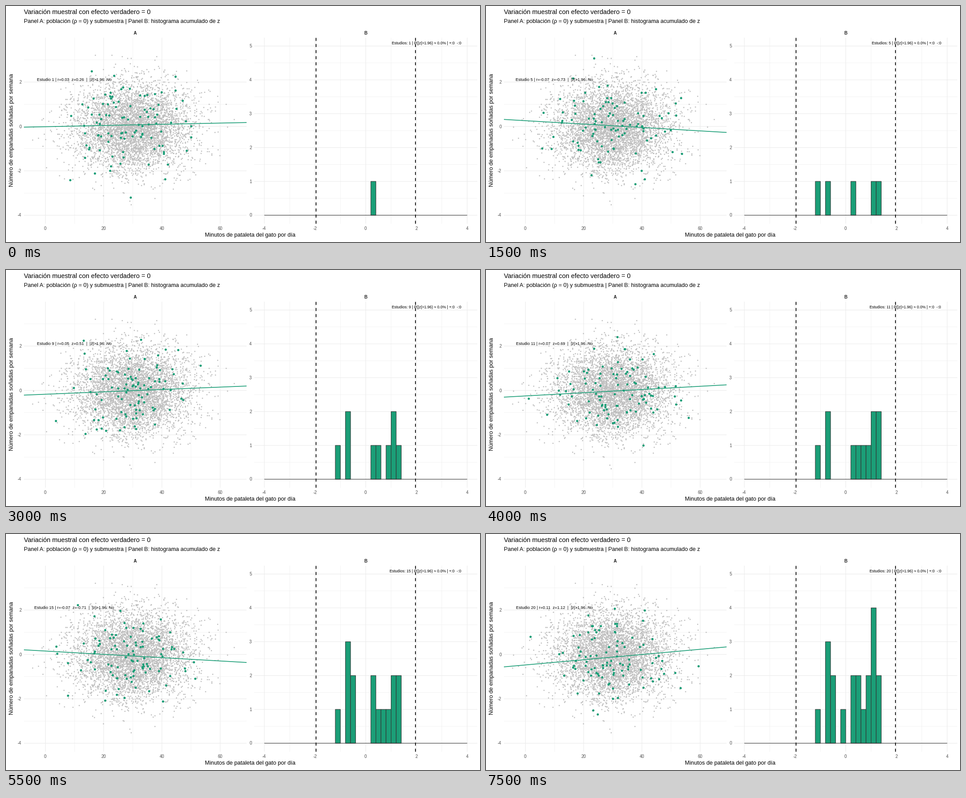
Recreate the animation shown at these times as a matplotlib script. Size 1058 by 529 pixels, loop 8000 ms.

```python
import numpy as np
import matplotlib.pyplot as plt
from matplotlib.animation import FuncAnimation

W, H, DPI = 1058, 529, 100
FRAMES, STUDIES, SIZE, POPULATION = 16, 20, 100, 5000
PX = 72 / DPI
GREEN, GREY, DARK, GRID = "#1b9e77", "#bebebe", "#333333", "#ebebeb"
TOP, BOTTOM = 71, 488
UNIT_AX, UNIT_AY, UNIT_BX, UNIT_BY = 6.5, 49.75, 56.6, 75.85

# z statistic of every study, in order
Z = np.array([0.26, -1.08, 1.08, 1.27, -0.73, 1.05, 0.84, -0.66, 0.51, 1.31,
              0.69, -0.47, -0.52, 0.21, -0.71, 0.92, 0.49, -0.08, 1.05, 1.12])
EDGES = np.round(np.arange(-4, 4.1, 0.2), 1)

plt.rcParams["font.family"] = "Liberation Sans"
fig = plt.figure(figsize=(W / DPI, H / DPI), dpi=DPI, facecolor="white")
ax = fig.add_axes([0, 0, 1, 1])
ax.set_xlim(0, W)
ax.set_ylim(H, 0)
ax.axis("off")


# data units to stage pixels
def ax_x(v):
    return 88 + UNIT_AX * v


def ax_y(v):
    return 270 - UNIT_AY * v


def bx_x(v):
    return 803 + UNIT_BX * v


def bx_y(v):
    return 469 - UNIT_BY * v


def label(x, y, s, size, ha="left", color="black", **kw):
    return ax.text(x, y, s, fontsize=size * PX, ha=ha, va="baseline",
                   color=color, zorder=9, **kw)


def line(xs, ys, width, color, z, **kw):
    return ax.plot(xs, ys, lw=width * PX, color=color, zorder=z, snap=False,
                   solid_capstyle="butt", dash_capstyle="butt", **kw)[0]


def dots(size, color, z):
    return ax.plot([], [], "o", ms=size * PX, mew=0, color=color, zorder=z)[0]


def panel(name, left, right, x_pos, y_pos, x_major, y_major, x_minor, y_minor):
    """Grid, tick labels and heading of one plot."""
    for xs, ys, width in ((x_minor, y_minor, 0.55), (x_major, y_major, 1.1)):
        for x in xs:
            line([x_pos(x)] * 2, [TOP, BOTTOM], width, GRID, width)
        for y in ys:
            line([left, right], [y_pos(y)] * 2, width, GRID, width)
    for v in x_major:
        label(x_pos(v) - 0.3, 501.5, str(v), 9.7, "center", "#4d4d4d")
    for v in y_major:
        label(left - 5.5, y_pos(v) + 3.5, str(v), 9.7, "right", "#4d4d4d")
    label((left + right) / 2 - 0.3, 64.5, name, 9.7, "center", "#1a1a1a",
          weight="bold")


def cloud(rng, n, reach):
    """Standard normal points no further out than `reach`."""
    p = rng.normal(size=(2 * n, 2))
    return p[np.hypot(*p.T) < reach][:n].T


panel("A", 40, 537, ax_x, ax_y, range(0, 61, 20), range(-4, 3, 2),
      range(10, 51, 20), range(-3, 4, 2))
panel("B", 554, 1052, bx_x, bx_y, range(-4, 5, 2), range(6),
      range(-3, 4, 2), np.arange(0.5, 5))

label(40, 18, "Variación muestral con efecto verdadero = 0", 14.4)
label(40, 38, "Panel A: población (ρ = 0) y submuestra | "
      "Panel B: histograma acumulado de z", 12.55)
label(545.5, 516.5, "Minutos de pataleta del gato por día", 12.65, "center")
label(16, 278.5, "Número de empanadas soñadas por semana", 12.65, "center",
      rotation=90, rotation_mode="anchor")

px, py = cloud(np.random.default_rng(7), POPULATION, 3.6)
dots(2.7, GREY, 2).set_data(ax_x(30 + 10 * px), ax_y(py))

points = dots(5, GREEN, 3)
fit = line([40, 537], [270, 270], 1.7, GREEN, 4)
bars = [ax.add_patch(plt.Rectangle((bx_x(e), bx_y(0)), UNIT_BX * 0.2, 0,
                                   fc=GREEN, ec=DARK, lw=1.1 * PX, zorder=4,
                                   snap=False))
        for e in EDGES[:-1]]
line(bx_x(EDGES[[0, -1]]), [bx_y(0)] * 2, 1.1, DARK, 5)
for limit in (-1.96, 1.96):
    line([bx_x(limit)] * 2, [BOTTOM, TOP], 1.707, "black", 6,
         linestyle=(0, (4, 4)))
note_a = label(152.5, 168.5, "", 9.2, "center")
note_b = label(1016, 86.5, "", 8.7, "right")


def draw(i):
    n = 1 + round(i * (STUDIES - 1) / (FRAMES - 1))
    seen, z = Z[:n], Z[n - 1]
    r = z / np.sqrt(SIZE)

    # the sample mean sinks slowly from study to study
    mean = 0.08 - 0.01 * n
    x, noise = cloud(np.random.default_rng(100 + n), SIZE, 3.3)
    points.set_data(ax_x(30 + 10 * x), ax_y(mean + r * x + noise))
    edge = (fit.get_xdata() - ax_x(30)) / (10 * UNIT_AX)
    fit.set_ydata(ax_y(mean + 1.05 * r * edge))

    for bar, count in zip(bars, np.histogram(seen, EDGES)[0]):
        bar.set_height(-UNIT_BY * count)
        bar.set_visible(bool(count))

    up, down = np.sum(seen > 1.96), np.sum(seen < -1.96)
    hit = "Sí" if abs(z) > 1.96 else "No"
    note_a.set_text(f"Estudio {n} | r={r:.2f}  z={z:.2f}  |  "
                    f"|z|>1.96: {hit}")
    note_b.set_text(f"Estudios: {n} | P(|z|>1.96) ≈ "
                    f"{100 * (up + down) / n:.1f}% | +:{up}  -:{down}")
    return [points, fit, note_a, note_b, *bars]


anim = FuncAnimation(fig, draw, frames=FRAMES, interval=500,
                     init_func=lambda: draw(0), repeat=True, repeat_delay=0)
plt.show()
```
